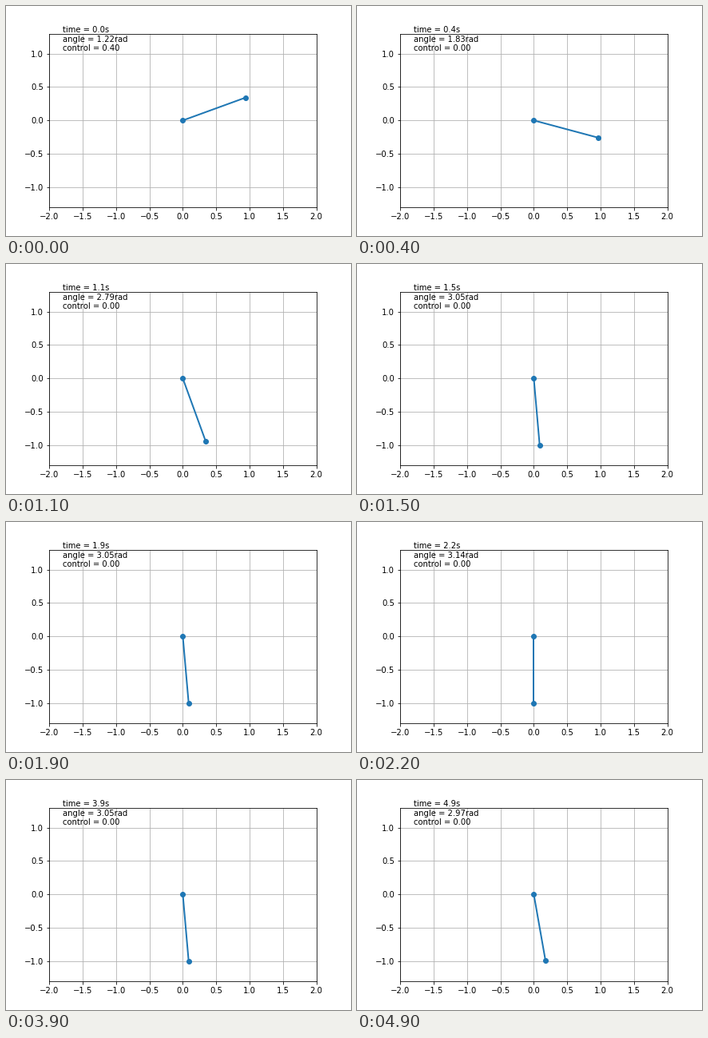
Recreate the animation shown at these times as a matplotlib script. Size 432 by 288 pixels, loop 5 s.

```python
import matplotlib.pyplot as plt
import numpy as np
from matplotlib.animation import FuncAnimation

FRAMES = 50
INTERVAL = 100  # ms
GRID = 5  # degrees between pendulum states

# Key poses of the swing; the angle is measured from upright.
KEY_TIMES = [0, 0.6, 0.8, 1.2, 2.0, 3.3, 3.8, 4.9]
KEY_DEGREES = [70, 120, 140, 170, 178, 180, 175, 170]

plt.rcParams.update({
    "font.family": "DejaVu Sans",
    "font.size": 10,
    "text.kerning_factor": 6,  # kern by whole pixels
})


def swing(time):
    """Pendulum angle in degrees, snapped to the state grid."""
    return GRID * round(np.interp(time, KEY_TIMES, KEY_DEGREES) / GRID)


def control(degrees):
    """Push only while the pendulum is above the horizontal."""
    return 0.4 if degrees < 90 else 0.0


fig, ax = plt.subplots(figsize=(6, 4), dpi=72, facecolor="white")
fig.subplots_adjust(left=0.125, right=0.9, bottom=0.125, top=0.88)
ax.set(aspect="equal", xlim=(-2, 2), ylim=(-1.3, 1.3),
       xticks=np.arange(-2, 2.1, 0.5), yticks=np.arange(-1, 1.1, 0.5))
ax.grid()

rod, = ax.plot([], [], "o-", lw=2)
label = ax.text(0.05, 0.9, "", transform=ax.transAxes)


def update(frame):
    time = frame * INTERVAL / 1000
    degrees = swing(time)
    angle = np.radians(degrees)
    rod.set_data([0, np.sin(angle)], [0, np.cos(angle)])
    label.set_text(f"time = {time:.1f}s\n"
                   f"angle = {angle:.2f}rad\n"
                   f"control = {control(degrees):.2f}")
    return rod, label


anim = FuncAnimation(fig, update, frames=FRAMES, interval=INTERVAL,
                     repeat=True, repeat_delay=0)
plt.show()
```
